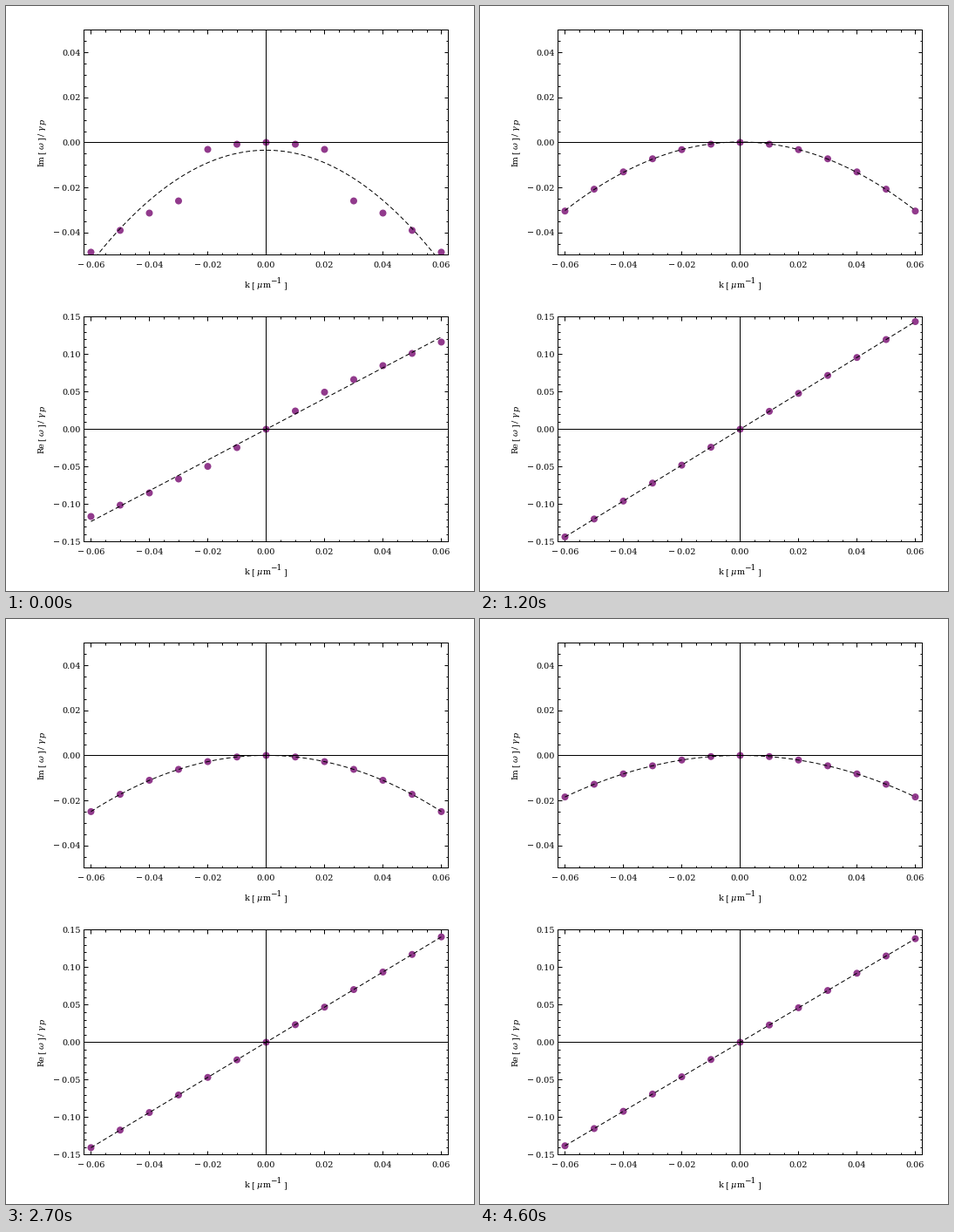
Recreate the animation shown at these times as a matplotlib script. Size 537x671 px, loop 4700 ms.

```python
import numpy as np
import matplotlib.pyplot as plt
from matplotlib.animation import FuncAnimation
from matplotlib.ticker import MultipleLocator

W, H, DPI = 537, 671, 72   # at 72 dpi one point is one pixel
FRAMES, INTERVAL = 47, 100
# Just short of the half pixel, so that lines snap to the pixel on the left/top
LEFT, WIDTH, HEIGHT = 89.49, 418, 258
TOPS = 27.49, 356.49
PER_K = 3350               # pixels per unit of k
PURPLE = "#913a8c"

plt.rcParams["font.family"] = "DejaVu Serif"
fig = plt.figure(figsize=(W / DPI, H / DPI), dpi=DPI, facecolor="white")

n = np.arange(-6, 7)
k = n * 0.01
ks = np.linspace(-0.06, 0.06, 241)

# Irregular spectrum at the very start, for |n| = 0..6
START_IM = -np.array([0, .0008, .0031, .0260, .0314, .0391, .0488])
START_RE = np.array([0, .0244, .0495, .0663, .0849, .1012, .1163])


def spectrum(t):
    """Imaginary and real parts of the mode at step t."""
    if t == 0:
        return START_IM[abs(n)], np.sign(n) * START_RE[abs(n)]
    quad = 8.62e-4 - 4.94e-6 * t - 5.8e-8 * t**2
    quart = 7.0e-6 * np.exp(-0.13 * t)
    speed = 0.02395 - 2.03e-5 * t + 1.37e-3 * np.exp(-0.15 * t)
    return -(quad * n**2 + quart * n**4), speed * n


def put(x, y, s, size=9.6, **kw):
    fig.text(x / W, 1 - y / H, s, fontsize=size, va="baseline", **kw)


def number(v):
    return f"{v:.2f}".replace("-", "\u2212\u2009")


def x_label(y):
    put(274, y, "k")
    put(281, y, "[")
    put(288, y, "\u03bc", style="italic")
    put(295, y, "m")
    put(303.5, y - 5, "\u22121", 9)
    put(318, y, "]")


def y_label(y, name):
    def part(dy, s, x=43.5, **kw):
        put(x, y - dy, s, rotation=90, rotation_mode="anchor", **kw)

    part(0, name)
    part(14.5, "[")
    part(20, "\u03c9", style="italic")
    part(30, "]")
    part(35, "/")
    part(41, "\u03b3", style="italic")
    part(48.5, "p", 45, style="italic")


def panel(top, y_max, major, minor, labels, name):
    ax = fig.add_axes([LEFT / W, 1 - (top + HEIGHT) / H, WIDTH / W, HEIGHT / H])
    x_max = WIDTH / 2 / PER_K
    ax.set(xlim=(-x_max, x_max), ylim=(-y_max, y_max))
    ax.patch.set_visible(False)
    for axis, big, small in ((ax.xaxis, 0.02, 0.005), (ax.yaxis, major, minor)):
        axis.set_major_locator(MultipleLocator(big))
        axis.set_minor_locator(MultipleLocator(small))
    ax.tick_params(which="both", direction="in", top=True, right=True,
                   labelleft=False, labelbottom=False, width=1)
    ax.tick_params(which="major", length=4.5)
    ax.tick_params(which="minor", length=2.5)
    for spine in ax.spines.values():
        spine.set_linewidth(1)
    ax.axhline(0, color="black", lw=1, zorder=2.2)
    ax.axvline(0, color="black", lw=1, zorder=2.2)

    mid_x, mid_y = LEFT + WIDTH / 2, top + HEIGHT / 2
    for v in labels:
        put(85.5, mid_y - v / y_max * HEIGHT / 2 + 3.5, number(v), ha="right")
    for v in np.arange(-3, 4) * 0.02:
        put(mid_x + v * PER_K, top + 272.5, number(v), ha="center")
    x_label(top + 296)
    y_label(top + 157, name)

    # One size per dot keeps their positions free of pixel rounding
    dots = ax.scatter(k, k, s=np.full(k.size, 64), lw=0, color=PURPLE, zorder=2)
    fit, = ax.plot([], [], color="black", lw=1, dashes=(5, 3),
                   dash_capstyle="butt", zorder=2.3)
    return dots, fit


im_dots, im_fit = panel(TOPS[0], 0.05, 0.02, 0.005, np.arange(-2, 3) * 0.02, "Im")
re_dots, re_fit = panel(TOPS[1], 0.15, 0.05, 0.01, np.arange(-3, 4) * 0.05, "Re")


def update(t):
    im, re = spectrum(t)
    for dots, fit, vals, deg in ((im_dots, im_fit, im, 2), (re_dots, re_fit, re, 1)):
        dots.set_offsets(np.column_stack([k, vals]))
        fit.set_data(ks, np.polyval(np.polyfit(k, vals, deg), ks))
    return im_dots, im_fit, re_dots, re_fit


anim = FuncAnimation(fig, update, frames=FRAMES, interval=INTERVAL,
                     repeat=True, repeat_delay=0, blit=False)
plt.show()
```
